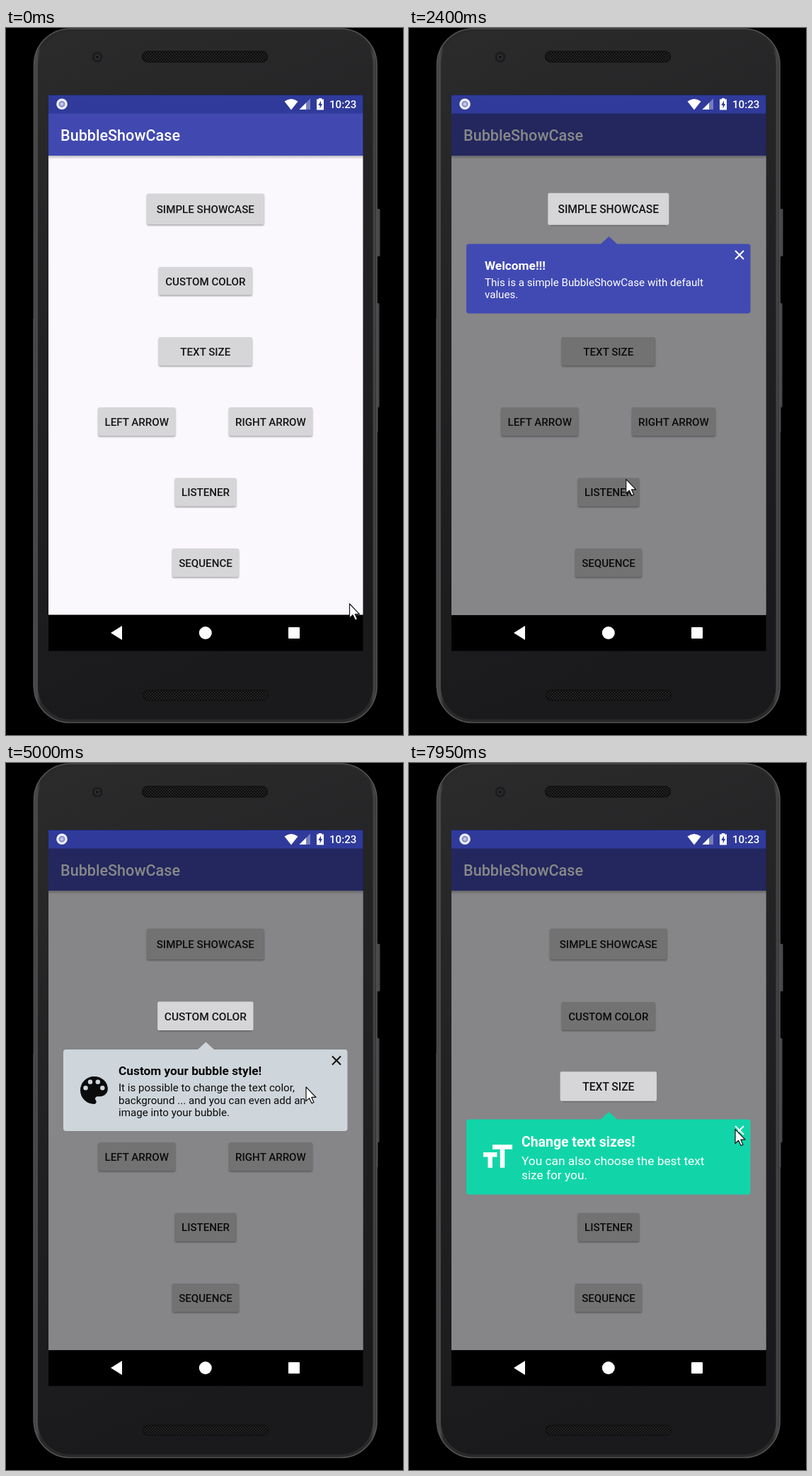
An HTML page that plays this animation: 561x997 px, repeating every 8 s.

```html
<!DOCTYPE html>
<html lang="en">
<head>
<meta charset="utf-8">
<title>BubbleShowCase</title>
<style>
  html, body { margin: 0; width: 100%; height: 100%; overflow: hidden; background: #000; }
  svg { display: block; width: 100%; height: 100%; font-family: Roboto, sans-serif; }
</style>
</head>
<body>
<svg id="stage" viewBox="0 0 561 997">
  <defs>
    <linearGradient id="rim" x2="1" y2="0">
      <stop offset="0" stop-color="#3a3a3b"/><stop offset=".008" stop-color="#4c4c4d"/>
      <stop offset=".02" stop-color="#29292a"/><stop offset=".98" stop-color="#29292a"/>
      <stop offset=".992" stop-color="#454546"/><stop offset="1" stop-color="#303031"/>
    </linearGradient>
    <linearGradient id="glass" x2=".2" y2="1">
      <stop offset="0" stop-color="#2b2b2c"/><stop offset=".5" stop-color="#212123"/>
      <stop offset="1" stop-color="#1a1a1c"/>
    </linearGradient>
    <linearGradient id="fall" x2="0" y2="1">
      <stop offset="0" stop-opacity=".25"/><stop offset="1" stop-opacity="0"/>
    </linearGradient>
    <pattern id="mesh" width="4" height="4" patternUnits="userSpaceOnUse">
      <rect width="4" height="4" fill="#242425"/>
      <circle cx="1" cy="1" r="1.1" fill="#080808"/><circle cx="3" cy="3" r="1.1" fill="#080808"/>
    </pattern>
    <filter id="soft" x="-10%" y="-20%" width="120%" height="150%"><feGaussianBlur stdDeviation="1"/></filter>
  </defs>

  <rect width="561" height="997"/>
  <g fill="#48484a">
    <rect x="522" y="255" width="6.5" height="67" rx="1.5"/>
    <rect x="522" y="388" width="5.5" height="147" rx="1.5"/>
    <rect x="521" y="533" width="4.5" height="37"/>
    <rect x="38" y="410" width="3" height="520" fill="#2b2b2c"/>
  </g>
  <rect x="39.500" y="1" width="484.500" height="978.500" rx="51" fill="url(#rim)" stroke="#525253" stroke-width="1.6"/>
  <rect x="45" y="5.500" width="473.500" height="969.500" rx="46" fill="url(#glass)"/>
  <rect x="192.5" y="33" width="177" height="15" rx="7.5" fill="url(#mesh)" stroke="#111" stroke-width="1.5"/>
  <rect x="193.5" y="934" width="177" height="14" rx="7" fill="url(#mesh)" stroke="#111" stroke-width="1.5"/>
  <circle cx="129" cy="41" r="8" fill="#1d1d1f" stroke="#29292a"/>
  <circle cx="129" cy="41" r="4" fill="#2e2e31"/><circle cx="129" cy="41" r="2" fill="#121214"/>

  <rect x="60" y="94.5" width="444.5" height="784"/>
  <rect x="60" y="180" width="444.5" height="647.5" fill="#faf8fc"/>
  <rect x="60" y="180" width="444.5" height="5" fill="url(#fall)"/>
  <rect x="60" y="120" width="444.5" height="60" fill="#4149b0"/>
  <text x="77" y="158.5" font-size="21.6" font-weight="500" fill="#fff">BubbleShowCase</text>
  <g id="buttons"></g>
  <rect id="press" x="235" y="734" width="94" height="40" rx="2"/>
  <rect id="dim" x="60" y="120" width="444.5" height="707"/>

  <rect x="60" y="94.5" width="444.5" height="26" fill="#2f3a9b"/>
  <circle cx="79" cy="107.3" r="6.2" fill="#8d94cc" stroke="#eef0fb" stroke-width="3.2"/>
  <circle cx="79" cy="107.3" r="2.2" fill="#c5c9e8"/>
  <g fill="#fff">
    <path d="M393.5 103.5Q403 96.500 412.500 103.500L403 115.500Z"/>
    <path d="M430 99.500V115H414.500Z" opacity=".35"/>
    <path d="M424 105.500V115H414.500Z"/>
    <path d="M441.800 100.500V99H446.200V100.500H449V115.500H439V100.500Z"/>
    <path d="M445 102.500L441.300 109H443.600V113.500L447 107H445Z" fill="#2f3a9b"/>
    <text x="457" y="113" font-size="15.13" font-weight="500">10:23</text>
    <path d="M148 853L164 843V863Z"/>
    <circle cx="281.8" cy="853" r="9"/>
    <rect x="399" y="845" width="16" height="16" rx="1"/>
  </g>

  <g id="steps"></g>
  <path id="cursor" d="M0 0V20L4.600 15.800L8 23L11 21.700L7.800 14.600H14Z" fill="#fff" stroke="#111" stroke-width="1.2" stroke-linejoin="round"/>
</svg>
<script>
const LOOP = 8000, MID = 281.75, DIM = 0.465;
const $ = id => document.getElementById(id);
const clamp = x => Math.min(1, Math.max(0, x));
const smooth = x => x * x * (3 - 2 * x);
const accDec = x => (1 - Math.cos(Math.PI * x)) / 2;

// label, centre x, centre y, width, height
const buttons = [
  ['SIMPLE SHOWCASE', 281.8, 255.3, 165.5, 43.5],
  ['CUSTOM COLOR', 281.8, 356.8, 132, 39.5],
  ['TEXT SIZE', 281.8, 456, 132, 40],
  ['LEFT ARROW', 184.8, 555, 109, 40],
  ['RIGHT ARROW', 374, 555, 118, 40],
  ['LISTENER', 282, 654.5, 86.5, 40],
  ['SEQUENCE', 282, 754, 94, 40]
];

const steps = [
  { from: 1693, to: 3780, top: 304.5, h: 98, fill: '#414ab3', ink: '#fff', x: 107,
    title: 'Welcome!!!', size: 17.29, body: 15.13, base: [36, 59, 17.7],
    lines: ['This is a simple BubbleShowCase with default', 'values.'] },
  { from: 4520, to: 6490, top: 404, h: 115, fill: '#ced6db', ink: '#0b0b0c', x: 159,
    title: 'Custom your bubble style!', size: 17.29, body: 15.13, base: [35.7, 59, 17.7],
    lines: ['It is possible to change the text color,', 'background ... and you can even add an', 'image into your bubble.'],
    icon: 'M12 3a9 9 0 0 0 0 18c.83 0 1.5-.67 1.5-1.5 0-.39-.15-.74-.39-1.01-.23-.26-.38-.61-.38-.99 0-.83.67-1.5 1.5-1.5H16a5 5 0 0 0 5-5c0-4.42-4.03-8-9-8z' +
      [[6.5, 10.5], [9.5, 6.5], [14.5, 6.5], [17.5, 10.5]]
        .map(([x, y]) => `M${x - 1.5} ${y}a1.5 1.5 0 1 0 3 0a1.5 1.5 0 1 0-3 0z`).join('') },
  { from: 7250, to: LOOP, top: 502.5, h: 106, fill: '#11d5a8', ink: '#fff', x: 159,
    title: 'Change text sizes!', size: 19.45, body: 17.29, base: [38.8, 64.2, 20],
    lines: ['You can also choose the best text', 'size for you.'],
    icon: 'M9 4v3h5v12h3V7h5V4H9zM3 12h3v7h3v-7h3V9H3z' }
];

// time, x, y of the pointer tip
const path = [
  [150, 485.5, 812], [750, 260.5, 739.5], [2200, 260.5, 739.5], [2820, 447.5, 322],
  [3300, 447.5, 322], [3600, 462, 317], [3850, 462, 317], [4400, 395, 365],
  [4600, 395, 365], [5050, 425, 460], [5700, 465, 411], [6530, 465, 411],
  [6830, 462, 470], [7300, 462, 470], [7800, 461, 516.5]
];

function buttonSvg([label, cx, cy, w, h], shadow) {
  const box = `x="${cx - w / 2}" y="${cy - h / 2}" width="${w}" height="${h}" rx="2"`;
  return (shadow ? `<rect ${box} transform="translate(0 1.5)" opacity=".35" filter="url(#soft)"/>` : '') +
    `<rect ${box} fill="#d6d5d7"/>` +
    `<text x="${cx}" y="${cy + 5.9}" text-anchor="middle" font-size="15.13" font-weight="500" fill="#151516">${label}</text>`;
}

function bubbleSvg(s) {
  const [first, next, lead] = s.base;
  const lines = s.lines.map((line, i) =>
    `<text x="${s.x}" y="${s.top + next + i * lead}" font-size="${s.body}">${line}</text>`).join('');
  const icon = s.icon
    ? `<path transform="translate(98.500 ${s.top + s.h / 2 - 25.9}) scale(2.16)" fill-rule="evenodd" d="${s.icon}"/>` : '';
  return `<g fill="${s.fill}"><rect x="81" y="${s.top}" width="401.500" height="${s.h}" rx="4"/>
    <path d="M270.500 ${s.top + .5}L282.500 ${s.top - 10.5}L294.500 ${s.top + .5}Z"/></g>
    <g fill="${s.ink}">
      <text x="${s.x}" y="${s.top + first}" font-size="${s.size}" font-weight="700">${s.title}</text>${lines}${icon}
      <path d="M461 ${s.top + 9.5}l12 12m0-12l-12 12" stroke="${s.ink}" stroke-width="2"/>
    </g>`;
}

$('buttons').innerHTML = buttons.map(b => buttonSvg(b, true)).join('');
$('steps').innerHTML = steps.map((s, i) =>
  `<g><g>${buttonSvg(buttons[i])}</g><g>${bubbleSvg(s)}</g></g>`).join('');
const stepNodes = [...$('steps').children];

const scaleAt = (node, k, x, y) =>
  node.setAttribute('transform', `translate(${x} ${y}) scale(${k}) translate(${-x} ${-y})`);

function pointer(t) {
  const i = path.findIndex(p => p[0] > t);
  if (i === 0) return path[0].slice(1);
  if (i < 0) return path[path.length - 1].slice(1);
  const [t0, x0, y0] = path[i - 1], [t1, x1, y1] = path[i];
  const k = smooth((t - t0) / (t1 - t0));
  return [x0 + (x1 - x0) * k, y0 + (y1 - y0) * k];
}

function draw(t) {
  const fade = clamp((t - 930) / 700);
  $('dim').setAttribute('opacity', DIM * (1 - (1 - fade) ** 2));
  $('press').setAttribute('opacity', 0.1 * clamp((t - 870) / 60) * clamp((1450 - t) / 300));

  steps.forEach((s, i) => {
    const node = stepNodes[i], age = t - s.from;
    const on = age >= 0 && t < s.to;
    node.setAttribute('display', on ? 'inline' : 'none');
    if (!on) return;
    const [, cx, cy] = buttons[i];
    scaleAt(node.children[0], 1 + 0.033 * accDec(age / 700), cx, cy);
    scaleAt(node.children[1], accDec(clamp(age / 200)), MID, s.top + s.h / 2);
  });

  $('cursor').setAttribute('transform', `translate(${pointer(t)})`);
}

const start = performance.now();
function tick() {
  draw((performance.now() - start) % LOOP);
  requestAnimationFrame(tick);
}
tick();
</script>
</body>
</html>
```
